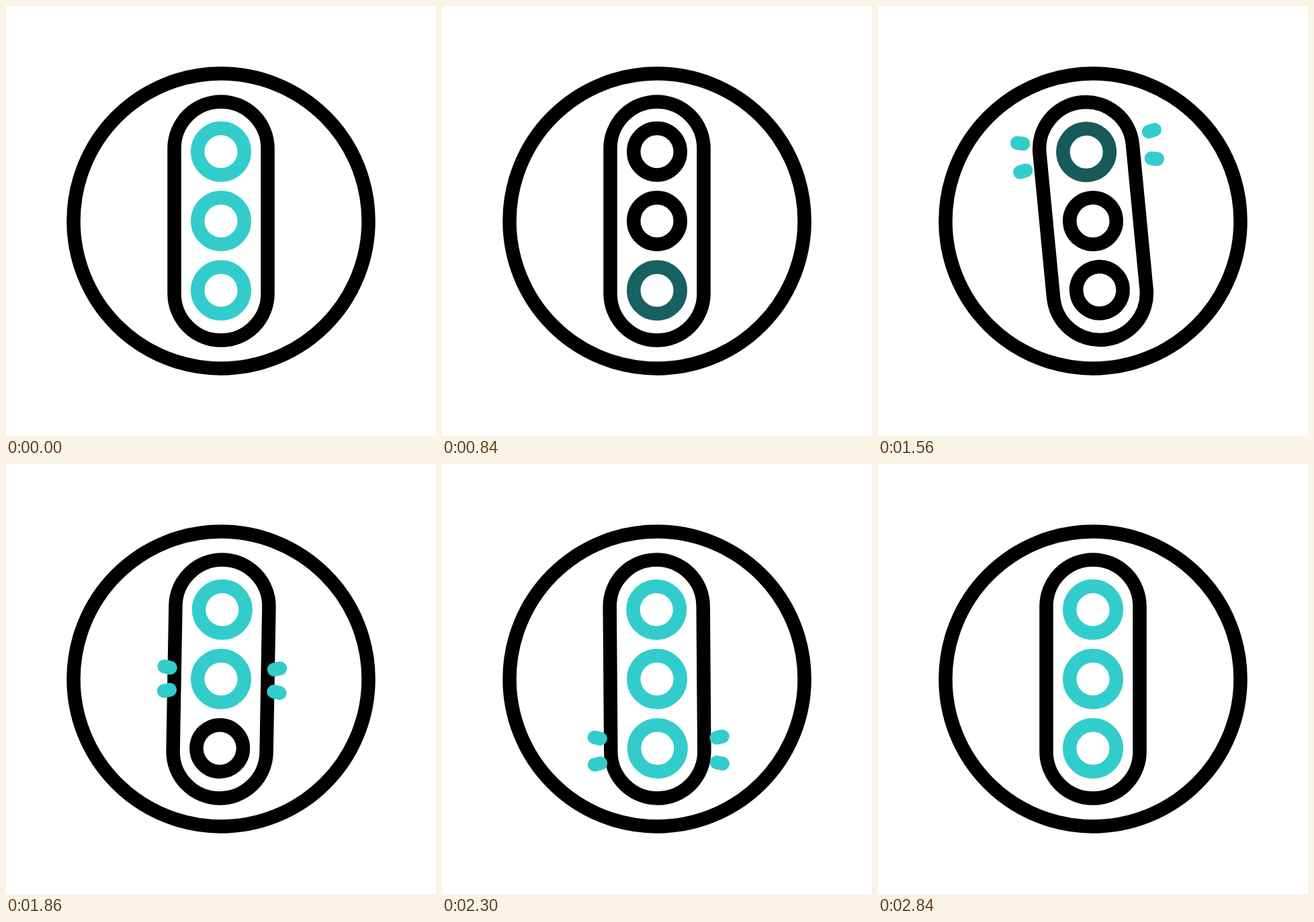
An HTML page that plays this animation: 640 px wide and 640 px high, repeating every 3.32 s.

```html
<!DOCTYPE html>
<html lang="en">
<head>
<meta charset="utf-8">
<title>Traffic light</title>
<style>
  html, body { margin: 0; width: 100%; height: 100%; overflow: hidden; background: #fff; }
  svg { display: block; width: 100%; height: 100%; }
  .line { fill: none; stroke: #000; stroke-width: 20.5; stroke-linecap: round; }
  .ray { stroke: #3cc; }
</style>
</head>
<body>
<svg viewBox="0 0 640 640">
  <circle class="line" cx="320" cy="320" r="219.5"/>
  <g id="signal">
    <rect class="line" x="250.5" y="142.5" width="139" height="355" rx="69.5"/>
  </g>
</svg>
<script>
const LOOP = 3320, TICK = 20;
const TEAL = [51, 204, 204];

// Each track is a list of [time, value], eased between neighbours.
const TILT = [[1260, 0], [1600, -5.7], [2050, 5.2], [2460, -3.3], [2840, 0]];
const GLOW = [
  [[320, 1], [527, 0], [1260, 0], [1455, 1], [1650, 0], [1845, 1]],
  [[527, 1], [733, 0], [1650, 0], [1845, 1]],
  [[733, 1], [940, 0], [1845, 0], [2040, 1]]
];

const RAY = { first: 1283, gap: 390, speed: 0.1875, from: 53, to: 116, length: 9, spread: 12 };
const LIGHT_Y = [216.8, 320, 423.2];
const RAY_Y = [215.5, 321, 426.5];

const signal = document.getElementById('signal');

function add(tag, attributes) {
  const node = document.createElementNS('http://www.w3.org/2000/svg', tag);
  for (const key in attributes) node.setAttribute(key, attributes[key]);
  return signal.appendChild(node);
}

const lights = LIGHT_Y.map(cy => add('circle', { class: 'line', cx: 320, cy, r: 34.75 }));
const bursts = RAY_Y.map(y =>
  [-RAY.spread, RAY.spread, 180 - RAY.spread, 180 + RAY.spread].map(angle =>
    add('line', { class: 'line ray', transform: `translate(321.5 ${y}) rotate(${angle})` })));

const clamp = (v, low, high) => Math.min(high, Math.max(low, v));
const ease = p => p * p * (3 - 2 * p);

function valueAt(track, t) {
  if (t <= track[0][0]) return track[0][1];
  for (let i = 1; i < track.length; i++) {
    const [t0, a] = track[i - 1], [t1, b] = track[i];
    if (t <= t1) return a + (b - a) * ease((t - t0) / (t1 - t0));
  }
  return track[track.length - 1][1];
}

function drawBurst(rays, age) {
  const head = RAY.from + age * RAY.speed;
  const tail = head - RAY.length;
  const visible = age > 0 && tail < RAY.to;
  for (const ray of rays) {
    ray.style.display = visible ? '' : 'none';
    ray.setAttribute('x1', clamp(tail, 0, RAY.to));
    ray.setAttribute('x2', clamp(head, 0, RAY.to));
  }
}

function draw(t) {
  signal.setAttribute('transform', `rotate(${valueAt(TILT, t)} 320 320)`);
  lights.forEach((light, i) => {
    const glow = valueAt(GLOW[i], t);
    light.style.stroke = `rgb(${TEAL.map(c => Math.round(c * glow))})`;
  });
  bursts.forEach((rays, i) => drawBurst(rays, t - RAY.first - i * RAY.gap));
}

const start = performance.now();
function tick() {
  const t = (performance.now() - start) % LOOP;
  draw(Math.floor(t / TICK) * TICK);
  requestAnimationFrame(tick);
}
tick();
</script>
</body>
</html>
```
